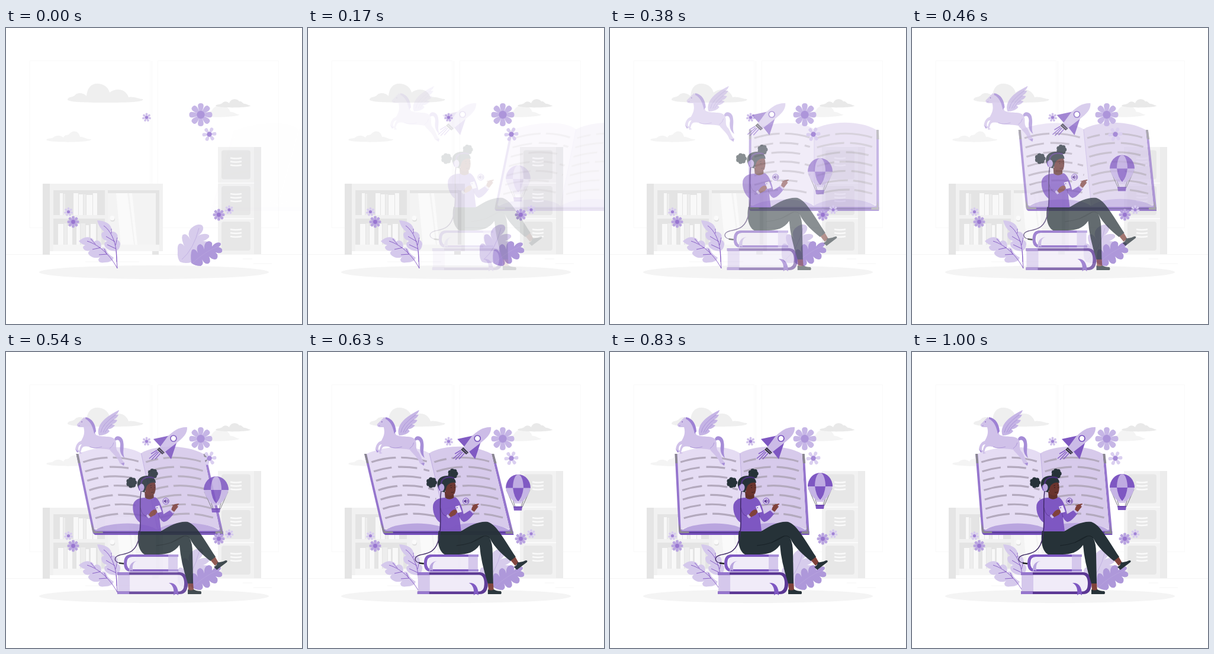
These frames come from a looping animation (500 by 500 pixels, 1040 ms). An HTML page:

```html
<!DOCTYPE html>
<html lang="en">
<head>
<meta charset="utf-8">
<title>Reading</title>
<style>
html, body { margin: 0; width: 100%; height: 100%; overflow: hidden; background: #fff; }
svg { display: block; width: 100vw; height: 100vh; }
</style>
</head>
<body>
<svg viewBox="0 0 500 500">
  <g id="room">
    <path d="M40 55.500H244V337.500H40ZM256.500 55.500H460.500V337.500H256.500ZM246.500 56V337" fill="none" stroke="#f9f9f9"/>
    <path d="M0 382.500H500M400 390H416M418 398H449M134 395H174M185 395H225" stroke="#f3f3f3" stroke-width=".8"/>
    <path d="M104 121C105 115 113 118 117 113C122 108 131 110 136 115C137 102 143 94 154 94C166 94 173 101 175 109C186 100 203 103 207 117C216 115 224 120 231 120C236 126 192 126 168 126C145 126 106 126 104 121Z" fill="#efefef"/>
    <path d="M68 189C71 185 77 188 81 184C87 180 93 182 97 185C99 179 105 182 107 179C112 172 123 173 125 184C131 183 133 188 144 188C146 194 70 194 68 189Z" fill="#f4f4f4"/>
    <path d="M333 148C337 143 342 145 348 139C352 131 362 129 365 134C370 130 376 134 379 142C385 141 387 146 394 146C395 151 334 152 333 148Z" fill="#f4f4f4"/>
    <path d="M354 131C358 128 363 130 366 126C370 123 374 124 377 127C380 118 391 119 394 124C399 123 399 128 403 128C407 128 409 131 413 131C414 135 355 136 354 131Z" fill="#e9e9e9"/>
    <g id="shelf">
      <path d="M62 263H265V377H258V383H247V377H74V383H62Z" fill="#f1f1f1"/>
      <path d="M62 263H74V383H62ZM247 377H258V383H247Z" fill="#e5e5e5"/>
      <path d="M80 274H167V316H80ZM80 322H167V366H80ZM172 274H259V366H172Z" fill="#e4e4e4"/>
      <path d="M172 279H253V366H172Z" fill="#f3f3f3"/>
      <path d="M186 279H205L216 366H194ZM208 279H213L222 366H218Z" fill="#fafafa"/>
      <path d="M80 366H259V377H80Z" fill="#f5f5f5"/>
      <circle cx="180" cy="323" r="4" fill="#dedede"/><circle cx="179.500" cy="321" r="4" fill="#fafafa"/>
    </g>
    <g id="cabinet">
      <path d="M358 201H431V382H358Z" fill="#f2f2f2"/>
      <path d="M419 201H431V382H419Z" fill="#ececec"/>
      <path d="M358 262H419M358 322H419" stroke="#fafafa" stroke-width="2"/>
    </g>
    <ellipse cx="250" cy="412.500" rx="194" ry="11.500" fill="#f4f4f4"/>
  </g>

  <g id="plants">
    <path d="M154 325C165 325 176 330 178 338Q178 343 175 345Q184 342 188 349Q190 354 186 358Q193 358 193 366Q192 374 186 377Q171 376 167 369Q164 362 171 360Q161 357 161 349Q161 345 166 344Q157 338 154 325Z" fill="#d5c9ec"/>
    <path d="M123 360Q133 351 142 354Q149 356 148 361Q156 356 160 363Q162 369 159 373Q167 368 170 376Q172 382 182 388Q179 396 167 396Q156 398 156 391Q157 388 159 387Q148 391 140 383Q137 379 142 376Q132 378 130 371Q130 368 134 367Q127 365 123 360Z" fill="#d5c9ec"/>
    <path d="M186 377L188 406C178 387 160 367 137 360M187 395C188 371 181 345 165 334M186 373L171 366M184 361L169 352M178 347L178 339M185 367L188 354M171 382L157 383M160 371L146 374M151 365L143 356M170 382L166 373" fill="none" stroke="#8055c2" stroke-width=".9"/>
    <path d="M325 332Q334 331 333 340Q331 347 324 351Q337 345 343 350Q345 355 333 360Q347 360 345 369Q340 380 325 390Q307 401 294 395Q289 389 290 377Q289 365 294 364Q300 364 303 372Q295 357 298 350Q304 344 312 358Q305 347 312 339Q318 333 325 332Z" fill="#d7ccec"/>
    <path d="M313 397Q311 382 314 375Q319 371 324 380Q320 367 328 365Q333 366 335 374Q334 361 343 360Q350 361 348 369Q355 360 362 363Q365 366 359 370Q367 372 365 378Q362 382 354 379Q360 384 356 390Q350 393 343 386Q347 395 342 398Q336 400 331 391Q335 399 329 402Q319 402 313 397Z" fill="#ae98da"/>
    <path d="M315 397Q337 377 358 369M297 391Q317 374 326 338" fill="none" stroke="#b9a6df" stroke-width=".7"/>
  </g>

  <g id="book"><g transform="translate(1.2 0)">
    <path d="M106 172H111L121 300H332L321 172H325L337 304V309H122Q117 309 116.500 303Z" fill="#9575cd"/>
    <path d="M118 303H337V309H122Q118 309 118 303Z" fill="#7650bd"/>
    <path d="M120 305H336" stroke="#4f3688" stroke-width="1.500"/>
    <path d="M106 172H110L111 188H107.500ZM116 289L121 303H134V306H120Q117 306 116.500 300ZM321 172H325L327 188H323ZM333 291L337 307H324V303H333Z" fill="#8a8791"/>
    <path d="M120 302C152 282 205 285 226 300C250 283 305 283 333 302Z" fill="#b9a5df"/>
    <path d="M110 172C136 160 190 154 216 171L227 300C205 286 152 286 120 300Z" fill="#e5dcf3"/>
    <path d="M216 171C240 157 290 155 321 172L332 300C305 286 250 284 227 300Z" fill="#d7caeb"/>
    <path d="M216 171L227 300" stroke="#b7a3de" stroke-width=".8"/>
    <g id="lines" fill="none" stroke="#b3a9bd" stroke-width="3.200"/>
  </g></g>

  <g id="flowers"></g>

  <g id="horse">
    <path d="M179 147C181 139 193 141 194 152C196 163 192 168 196 179C188 173 188 164 189 157C189 149 184 146 180 151Z" fill="#a58cd7"/>
    <path d="M128 110L131 113C140 118 143 130 148 140C159 145 174 140 180 148C184 155 180 161 184 167C190 173 190 181 196 187L194 192L188 188C185 178 177 173 171 165C160 162 146 165 136 160C130 160 127 158 124 163L122 169L125 171L120 172C119 165 121 160 124 156C119 156 118 160 118 165L121 168L117 170L113 164C114 157 117 152 123 150C126 144 130 138 127 127L120 127Q115 126 116 122Z" fill="#d0c1e9"/>
    <path d="M130 110C142 112 147 122 148 134L145 138C143 128 139 117 130 113Z" fill="#9d81d4"/>
    <path d="M153 141C149 132 154 121 163 113Q174 104 187 98Q186 103 181 106L186 106Q183 112 178 114L184 115Q181 121 175 122L180 124Q174 131 168 130L171 134Q165 141 153 141Z" fill="#c5b4e5"/>
    <path d="M156 136Q158 122 181 106M160 136Q165 123 178 114M163 136Q168 126 175 122M137 160Q146 164 158 160M171 163Q177 159 178 153M118 125L121 124" fill="none" stroke="#a087d1" stroke-width=".7"/>
    <circle cx="124" cy="118" r=".8" fill="#6540a8"/>
    <path d="M190 188L196 187L195 192ZM113 164L118 168L116 170Z" fill="#a58cd7"/>
  </g>

  <g id="rocket">
    <path d="M260 168L246 180M262 169L250 182M265 171L256 181M259 166L249 172" stroke="#8760c8" stroke-width="1.600"/>
    <path d="M253 147L281 141L265 160ZM272 167L293 151L283 181Z" fill="#7e57c2"/>
    <path d="M310 127C311 138 302 146 293 153L271 170L263 162L277 143C286 133 298 126 310 127Z" fill="#cbbbe7"/>
    <path d="M263 161L272 170L268 173L259 165Z" fill="#37383f"/>
    <path d="M262 164L270 171" stroke="#a88fd7" stroke-width="1"/>
    <circle cx="287" cy="146" r="5" fill="#fff" stroke="#7650bd" stroke-width="1.700"/>
  </g>

  <g id="balloon">
    <path d="M335 232L348 261M375 232L362 261M345 246L350 261M365 246L360 261" stroke="#777580" stroke-width="1"/>
    <path d="M334 229Q339 245 348 252H362Q371 245 376 229Z" fill="#f2edf9"/>
    <path d="M334 229H346Q349 246 354 252H348Q338 244 334 229ZM364 229H376Q372 244 362 252H356Q361 246 364 229Z" fill="#c5b4e5"/>
    <path d="M334 229A21 23 0 0 1 376 229Z" fill="#7e57c2"/>
    <path d="M346 229C346 216 350 206 355 206S364 216 364 229Z" fill="#bfabe2"/>
    <path d="M346 229H364Q362 245 355 252Q348 245 346 229Z" fill="#7e57c2"/>
    <path d="M348 252H362L361 255H349Z" fill="#d5c8ec"/>
    <path d="M347 260H362L361 267H348Z" fill="#7e57c2"/>
    <path d="M347 261H362" stroke="#6540a8" stroke-width="1.200"/>
  </g>

  <g id="reader">
    <g id="pile">
      <path d="M205 346H286V367H205Q199 357 205 346Z" fill="#f0ebf8"/>
      <path d="M270 345H286V368H270Z" fill="#d5c8ec"/>
      <path d="M287 342H207Q195 342 195 357Q195 371 207 371H287V367H209Q200 367 200 357Q200 346 209 346H287Z" fill="#7e57c2"/>
      <path d="M270 342H287V346H270ZM270 367H287V371H270Z" fill="#a58cd7"/>
      <path d="M218 353Q208 354 210 370L207 368L204 371Q203 354 218 353Z" fill="#b9a5df"/>
      <path d="M185 376H292Q302 390 292 405H185Z" fill="#f0ebf8"/>
      <path d="M185 376H205V405H185Z" fill="#d5c8ec"/>
      <path d="M184 372H289Q303 373 303 391Q303 409 289 409H184V404.500H288Q297 404 297 391Q297 377 288 376.500H184Z" fill="#5b3794"/>
      <path d="M184 372H204V376.500H184ZM184 404.500H204V409H184Z" fill="#9575cd"/>
      <path d="M271 390Q287 389 287 411L283 408L279 411Q281 395 271 390Z" fill="#7e57c2"/>
    </g>
    <path d="M303 390H312L313 403H304ZM340 350L348 344L355 356L349 361Z" fill="#80423b"/>
    <path d="M303 401Q309 404 313 401Q317 404 325 404Q327 407 325 409H303ZM347 363Q353 360 353 355Q360 356 367 352Q371 352 369 355L352 368Z" fill="#263238"/>
    <path d="M220 302H259C274 292 290 285 303 287C318 292 330 316 350 346L341 353C329 343 315 332 306 314Q311 323 311 340L312 391H303Q291 354 289 326C280 339 267 342 254 342H230C219 336 217 316 220 302Z" fill="#263238"/>
    <path d="M306 314C299 306 289 314 275 322M250 327Q276 325 296 311" fill="none" stroke="#161f24" stroke-width=".8"/>
    <path d="M230 236H245L246 249Q238 253 231 248Z" fill="#5f302b"/>
    <path d="M231 246Q238 252 247 245C254 247 259 260 262 274L275 266L280 272Q269 287 262 287Q257 284 255 279L258 303H221L222 288C213 281 209 269 210.500 258Q214 246 231 246Z" fill="#7e57c2"/>
    <path d="M223 263Q226 280 238 277M255 279Q252 270 252 263" fill="none" stroke="#5b3794" stroke-width=".8"/>
    <path d="M275 267C276 262 278 258 282 257L288 256L285 260L287 261L280 270ZM237 275Q241 267 247 266L253 268L248 275L240 279Z" fill="#80423b"/>
    <path d="M235 274L240 279L237 281L233 277ZM274 265L280 271L278 273L272 267Z" fill="#cdbde8"/>
    <path d="M248 261L255 259L259 270L252 272Z" fill="#e9e1f5"/><circle cx="251" cy="263" r="1" fill="#7e57c2"/>
    <path d="M276 259L288 257" stroke="#80423b" stroke-width="1.200"/>
    <path d="M229 221Q238 213 247 219Q250.500 229 247 239Q240 246 232 239Z" fill="#6a342e"/>
    <g id="hair" fill="#263238">
      <path d="M218 226C216 213 226 208 238 209Q248 211 249 221Q240 219 234 226L230 237Q220 236 218 226Z"/>
    </g>
    <path d="M225 228C221 214 233 209 246 213" fill="none" stroke="#493078" stroke-width="2.600"/>
    <ellipse cx="225" cy="229" rx="4.500" ry="6.500" fill="#b9a5df"/>
    <path d="M221 225Q219 229 222 234" fill="none" stroke="#7e57c2" stroke-width="1.500"/>
    <path d="M239 226L242 225M246 225L248 226M241 237Q244 238 246 236" fill="none" stroke="#35201f" stroke-width=".9"/>
    <circle cx="241" cy="229" r=".8" fill="#231919"/><circle cx="247" cy="229" r=".7" fill="#231919"/>
    <path d="M224 235C220 264 226 286 221 312C216 339 202 340 188 343C177 346 177 356 192 357" fill="none" stroke="#3c2762" stroke-width="1.400"/>
    <path d="M187 356.500L195 357.500" stroke="#1e2024" stroke-width="2.400"/>
    <circle cx="266" cy="252" r="5.300" fill="#d7caee" stroke="#7e57c2" stroke-width="1"/>
    <path d="M262.500 250.500H264L266.500 248.500V255.500L264 253.500H262.500Z" fill="#5b3794"/>
    <path d="M267.700 250Q269 252 267.700 254M269 248.800Q271 252 269 255.200" fill="none" stroke="#5b3794" stroke-width=".8"/>
  </g>
</svg>
<script>
const $ = id => document.getElementById(id);

function add(parent, tag, attrs) {
  const el = document.createElementNS('http://www.w3.org/2000/svg', tag);
  for (const key in attrs) el.setAttribute(key, attrs[key]);
  parent.append(el);
  return el;
}

function flower(x, y, r, petals, color, heart, turn = 0) {
  const g = add($('flowers'), 'g', { transform: `translate(${x} ${y}) rotate(${turn})` });
  for (let i = 0; i < petals; i++) {
    add(g, 'path', {
      d: `M0 0C${-r * .16} ${-r * .4} ${-r * .46} ${-r} 0 ${-r}S${r * .16} ${-r * .4} 0 0Z`,
      fill: color, transform: `rotate(${360 / petals * i})`
    });
  }
  add(g, 'circle', { r: r * .34, fill: heart });
}

function shelfBook(x, height, width, fill, bottom) {
  add($('shelf'), 'rect', { x, y: bottom - height, width, height, fill });
}

function textRow(x, y, width, dashes) {
  add($('lines'), 'path', {
    d: `M${x} ${y + 7}Q${x + width / 2} ${y - 8} ${x + width} ${y + 6}`,
    'stroke-dasharray': dashes
  });
}

function bun(x, y, r) {
  add($('hair'), 'circle', { cx: x, cy: y, r: r * .75 });
  for (let i = 0; i < 7; i++) {
    const a = i * Math.PI * 2 / 7;
    add($('hair'), 'circle', { cx: x + r * .62 * Math.cos(a), cy: y + r * .62 * Math.sin(a), r: r * .4 });
  }
}

// Each shelf book: x, height, width
const shelves = {
  316: [[91, 37, 5], [97, 36, 3], [114, 37, 8], [123, 35, 7], [131, 35, 4], [136, 34, 10], [147, 37, 7]],
  366: [[88, 35, 9], [98, 36, 5], [104, 32, 8], [119, 35, 6], [126, 36, 8], [135, 33, 5], [143, 35, 9], [155, 36, 6]]
};
for (const bottom in shelves) {
  shelves[bottom].forEach((size, i) => shelfBook(...size, i % 3 === 1 ? '#ededed' : '#f8f8f8', bottom));
}

for (const y of [206.5, 267, 327]) {
  add($('cabinet'), 'rect', { x: 364, y, width: 49, height: 49, rx: 4, fill: '#e7e7e7' });
  for (const dy of [14, 20, 26]) {
    add($('cabinet'), 'path', {
      d: `M379 ${y + dy - 1}Q388 ${y + dy + 1} 398 ${y + dy - 1}`,
      fill: 'none', stroke: '#fafafa', 'stroke-width': 2.4
    });
  }
}

flower(329, 146.5, 19.5, 8, '#c6b6e6', '#ad95da');
flower(343.5, 179.5, 12, 6, '#dacff0', '#a68bd7', 25);
flower(237.5, 151, 7.5, 7, '#d0c1eb', '#a083d4');
flower(105.5, 310.5, 7.5, 7, '#d7cbef', '#a083d4');
flower(113.5, 327.5, 10, 8, '#b9a4e0', '#9876d0');
flower(359.5, 315.5, 10, 8, '#b9a4e0', '#9876d0');
flower(377, 307, 7.5, 7, '#d7cbef', '#a083d4');

const leftDashes = ['43 9', '32 11', '20 9 49', '34 9', '38 9', '30 8 35', '40 9'];
const rightDashes = ['22 9 70', '46 10', '39 10', '29 9 60', '48 10', '52 9', '55 8'];
for (let i = 0; i < 7; i++) {
  const y = 179 + i * 15.8, shift = i * 1.4;
  textRow(116 + shift, y, 94, leftDashes[i]);
  textRow(222 + shift, y, 93, rightDashes[i]);
}

bun(208, 220.5, 9);
bun(244, 205.5, 8.5);

function bezier(x1, y1, x2, y2) {
  const at = (a, b, s) => 3 * (1 - s) * (1 - s) * s * a + 3 * (1 - s) * s * s * b + s ** 3;
  return x => {
    if (x <= 0) return 0;
    if (x >= 1) return 1;
    let lo = 0, hi = 1;
    for (let i = 0; i < 24; i++) {
      const mid = (lo + hi) / 2;
      if (at(x1, x2, mid) < x) lo = mid; else hi = mid;
    }
    return at(y1, y2, lo);
  };
}

const easeIn = bezier(.42, 0, 1, 1);
const spring = bezier(.36, -.01, .5, 1.38);
const LOOP = 1040, FPS = 24, PHASE = .65, SLIDE = 30;
const slides = { horse: [1, 0], rocket: [-1, 0], balloon: [0, 1], reader: [1, 0] };
const tan = deg => Math.tan(deg * Math.PI / 180);
const mix = (a, b, p) => a + (b - a) * p;

function place(id, transform, opacity) {
  $(id).setAttribute('transform', transform);
  $(id).setAttribute('opacity', Math.min(1, Math.max(0, opacity)));
}

function poseBook(t) {
  const enter = easeIn(t / .6);
  let skew;
  if (t < .6) skew = mix(tan(-20), tan(10), enter);
  else if (t < .8) skew = mix(tan(10), tan(-2), easeIn((t - .6) / .2));
  else skew = mix(tan(-2), 0, easeIn((t - .8) / .2));
  // Skewed around the middle of the stage
  place('book', `matrix(1 0 ${skew} 1 ${250 * (1 - enter) - 250 * skew} 0)`, enter);
}

function draw(ms) {
  const step = Math.floor((ms % LOOP + 9) * FPS / 1000);
  const t = Math.min(1, (step + PHASE) / FPS);
  const p = spring(t), rest = SLIDE * (1 - p);
  poseBook(t);
  for (const id in slides) {
    const [dx, dy] = slides[id];
    place(id, `translate(${dx * rest} ${dy * rest})`, p);
  }
}

const start = performance.now();
function tick() {
  draw(performance.now() - start);
  requestAnimationFrame(tick);
}
tick();
</script>
</body>
</html>
```
